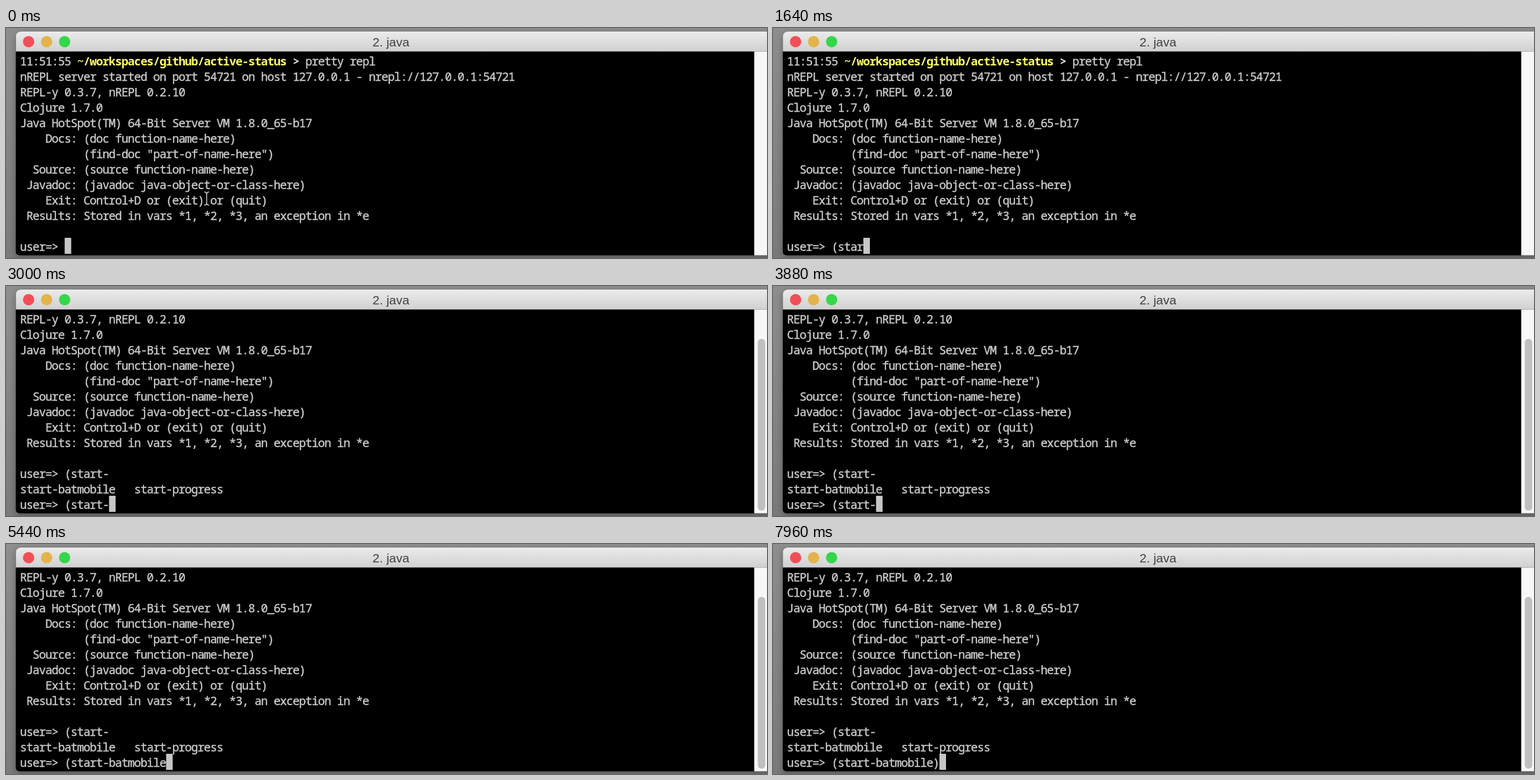
These frames come from a looping animation (1280 by 387 pixels, 8000 ms). An HTML page with a canvas:

```html
<!DOCTYPE html>
<html lang="en">
<head>
<meta charset="utf-8">
<title>Terminal</title>
<style>
  html, body { margin: 0; width: 100%; height: 100%; overflow: hidden; background: #868686; }
  canvas { display: block; width: 100vw; height: 100vh; }
</style>
</head>
<body>
<canvas id="stage" width="1280" height="387"></canvas>
<script>
const ctx = document.getElementById('stage').getContext('2d');
const LOOP = 8000;
const LEFT = 24, CELL = 32 / 3, ROW = 26, BASELINE = 63;
const FONT = '19.5px "Noto Sans Mono", "DejaVu Sans Mono", monospace';
const TEXT = '#cacaca', PATH = '#fbfb67';

const banner = [
  '11:51:55',
  'nREPL server started on port 54721 on host 127.0.0.1 - nrepl://127.0.0.1:54721',
  'REPL-y 0.3.7, nREPL 0.2.10',
  'Clojure 1.7.0',
  'Java HotSpot(TM) 64-Bit Server VM 1.8.0_65-b17',
  '    Docs: (doc function-name-here)',
  '          (find-doc "part-of-name-here")',
  '  Source: (source function-name-here)',
  ' Javadoc: (javadoc java-object-or-class-here)',
  '    Exit: Control+D or (exit) or (quit)',
  ' Results: Stored in vars *1, *2, *3, an exception in *e',
  ''
];
const completions = ['user=> (start-', 'start-batmobile   start-progress'];
const SCROLL_AT = 2640, TYPING_AT = 1000;

// Input line after each key press
const typed = [
  [0, ''], [TYPING_AT, '('], [1200, '(s'], [1320, '(st'], [1440, '(sta'],
  [1560, '(star'], [1720, '(start'], [1960, '(start-'],
  [4880, '(start-b'], [5120, '(start-batmobile'], [7320, '(start-batmobile)']
];

function vertical(y0, y1, from, to) {
  const g = ctx.createLinearGradient(0, y0, 0, y1);
  g.addColorStop(0, from);
  g.addColorStop(1, to);
  return g;
}

function box(x, y, w, h, fill, radius = 0) {
  ctx.fillStyle = fill;
  ctx.beginPath();
  ctx.roundRect(x, y, w, h, radius);
  ctx.fill();
}

function write(text, col, row, color = TEXT, weight = '') {
  ctx.textAlign = 'left';
  ctx.textBaseline = 'alphabetic';
  ctx.font = weight + ' ' + FONT;
  ctx.letterSpacing = '0px';
  const spacing = CELL - ctx.measureText('0').width;
  ctx.letterSpacing = spacing + 'px';
  const x = LEFT + col * CELL + spacing / 2;
  const y = BASELINE + row * ROW;
  ctx.fillStyle = ctx.strokeStyle = color;
  ctx.fillText(text, x, y);
  if (!weight) {
    // A hairline outline thickens the regular weight a little
    ctx.lineWidth = 0.45;
    ctx.lineJoin = 'round';
    ctx.strokeText(text, x, y);
  }
  ctx.letterSpacing = '0px';
}

function drawWindow() {
  box(0, 0, 1280, 387, vertical(0, 387, '#8e8e8e', '#7a7a7a'));
  ctx.save();
  ctx.shadowColor = 'rgba(0,0,0,.3)';
  ctx.shadowBlur = 12;
  ctx.shadowOffsetY = 4;
  box(16.5, 6, 1290, 376.5, '#000', [8, 0, 0, 6]);
  ctx.restore();
  box(16.5, 6, 1290, 33.5, vertical(6, 40, '#ebebeb', '#d0d0d0'), [8, 0, 0, 0]);
  box(1258.5, 39.5, 22, 343, '#f8f7f8');

  ['#f04f58', '#e2b44a', '#36d64a'].forEach((color, i) => {
    ctx.beginPath();
    ctx.arc(38 + i * 30.3, 23, 9.5, 0, Math.PI * 2);
    ctx.fillStyle = color;
    ctx.fill();
  });

  ctx.font = '21px "Liberation Sans", Arial, sans-serif';
  ctx.textAlign = 'center';
  ctx.textBaseline = 'alphabetic';
  ctx.fillStyle = '#404040';
  ctx.fillText('2. java', 647.5, 30.5);
}

function drawPointer(x, y) {
  ctx.beginPath();
  ctx.moveTo(x - 4, y - 11);
  ctx.quadraticCurveTo(x, y - 11, x, y - 7);
  ctx.lineTo(x, y + 7);
  ctx.quadraticCurveTo(x, y + 11, x - 4, y + 11);
  ctx.moveTo(x + 4, y - 11);
  ctx.quadraticCurveTo(x, y - 11, x, y - 7);
  ctx.moveTo(x, y + 7);
  ctx.quadraticCurveTo(x, y + 11, x + 4, y + 11);
  ctx.strokeStyle = '#d6d6d6';
  ctx.lineWidth = 1.5;
  ctx.stroke();
}

function draw(t) {
  const scrolled = t >= SCROLL_AT;
  drawWindow();
  const lines = scrolled ? banner.slice(2).concat(completions) : banner;
  lines.forEach((line, row) => write(line, 0, row));

  if (scrolled) {
    box(1264.5, 89, 12.5, 289, '#bfbfbf', 6);
  } else {
    write('~/workspaces/github/active-status', 9, 0, PATH, 'bold');
    write('>', 43, 0, '#e2e2e2', 'bold');
    write('pretty repl', 45, 0);
  }

  const input = 'user=> ' + typed.filter(([at]) => at <= t).pop()[1];
  write(input, 0, 12);
  box(LEFT + input.length * CELL, 353, 11, 27, '#c6c6c6');
  if (t < TYPING_AT) drawPointer(337.5, 287);
}

const start = performance.now();
function tick() {
  draw((performance.now() - start) % LOOP);
  requestAnimationFrame(tick);
}
tick();
</script>
</body>
</html>
```
